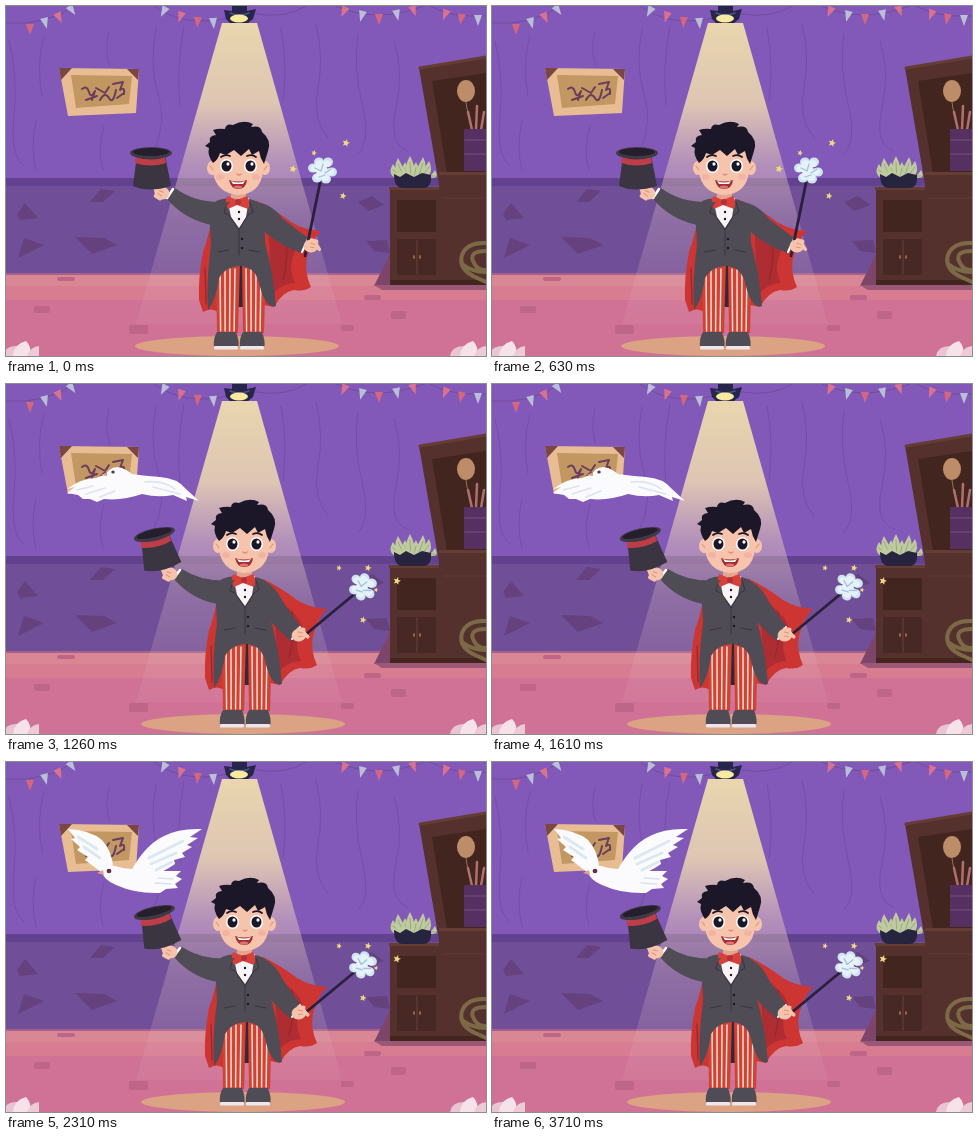
Animation, 480 px wide and 350 px high, one loop 3780 ms. Source, as an HTML page:

```html
<!DOCTYPE html>
<html lang="en">
<head>
<meta charset="utf-8">
<title>Magician</title>
<style>
html, body { margin: 0; width: 100%; height: 100%; overflow: hidden; background: #8259b8; }
svg { display: block; width: 480px; height: 350px; }
</style>
</head>
<body>
<svg id="stage" viewBox="0 0 480 350"></svg>
<script>
const LOOP = 3780, REVEAL = 1260, FLAP = 2170;

const shape = (d, fill, extra = '') => `<path d="${d}" fill="${fill}" ${extra}/>`;
const line = (d, color, w = 1, extra = '') =>
  `<path d="${d}" fill="none" stroke="${color}" stroke-width="${w}" stroke-linecap="round" stroke-linejoin="round" ${extra}/>`;
const oval = (x, y, rx, ry, fill, extra = '') =>
  `<ellipse cx="${x}" cy="${y}" rx="${rx}" ry="${ry}" fill="${fill}" ${extra}/>`;
const box = (x, y, w, h, fill, r = 0) =>
  `<rect x="${x}" y="${y}" width="${w}" height="${h}" rx="${r}" fill="${fill}"/>`;
const group = (inner, transform = '') => `<g transform="${transform}">${inner}</g>`;

const GREY = '#4f4c56', INK = '#1b1628', SKIN = '#f6c4ac', RED = '#d8403a', WHITE = '#fbfbfd';

function star(x, y, r = 4) {
  let d = '';
  for (let i = 0; i < 10; i++) {
    const a = i * Math.PI / 5 - 1.3, q = i % 2 ? r * .45 : r;
    d += (i ? 'L' : 'M') + (x + q * Math.cos(a)).toFixed(1) + ' ' + (y + q * Math.sin(a)).toFixed(1);
  }
  return shape(d + 'Z', '#f3d884');
}

const flag = (x, y, color, tilt) => group(shape('M-4 0H4L0 11Z', color), `translate(${x} ${y}) rotate(${tilt})`);

function bunting() {
  const pink = '#d9718f', pale = '#b9bfd6', red = '#d5667d';
  return line('M0 17Q40 20 68 0M148 0Q178 22 222 12M250 8Q280 13 300 0M330 0Q370 18 418 0M424 0Q446 12 480 10', '#6d4a98', .8) +
    [[24, 18, red, 0], [38, 12, pale, -15], [51, 7, pink, -25], [63, 0, pale, -35],
     [160, 1, pale, 28], [176, 6, pink, 18], [192, 11, red, 5], [207, 12, pale, -5],
     [340, 1, pink, 25], [357, 5, pale, 15], [373, 8, red, 0], [390, 4, pale, -12], [406, 0, pink, -20],
     [441, 4, pink, 22], [456, 8, red, 10], [472, 9, pale, 0]].map(f => flag(...f)).join('');
}

function room() {
  const cracks = 'M3 35Q12 70 8 110T18 160M38 30Q30 58 36 90M103 25Q98 45 104 60M150 22Q143 60 152 88' +
    'T148 145M178 20Q170 62 174 100M275 22Q282 60 277 96M310 18Q318 50 312 82T322 132' +
    'M352 28Q347 60 356 98T352 148M388 35Q398 65 390 102T402 145M30 115Q24 140 30 165M98 120Q91 145 97 164';
  const chips = 'M11 208L19 197L32 212L14 214ZM12 252L18 232L38 239ZM69 231L98 232L111 239L86 248Z' +
    'M84 196L95 183L109 185L97 196ZM352 196L366 190L378 199L362 205ZM360 235L381 234L384 247L368 245Z';
  const tiles = [[28, 300, 16, 7], [123, 319, 19, 9], [51, 271, 18, 4], [385, 305, 15, 8], [358, 289, 17, 5], [335, 319, 13, 6]];
  return box(0, 0, 480, 172, '#8259b8') + box(0, 172, 480, 96, '#704f98') +
    line(cracks, '#7047a5', 1, 'opacity=".65"') + box(0, 172, 480, 8, '#62428e') +
    shape(chips, '#65417d') + box(0, 268, 480, 82, '#d07296') +
    box(0, 268, 480, 12, '#d98795') + box(0, 280, 480, 14, '#d87c92') + box(0, 267, 480, 2, '#a5608b') +
    tiles.map(t => box(...t, '#bf6688', 2)).join('') + bunting();
}

function painting() {
  return shape('M53 62L133 63L130 107L62 110Z', '#e9bd93') +
    shape('M65 69L126 70L123 98L70 102Z', '#c39762') +
    line('M76 83Q81 79 83 86T89 85L86 94M90 82L99 87L103 81M94 94Q99 85 103 92T110 84M107 78L117 76L114 84Q119 80 118 88M80 94L91 90M111 92L118 87', '#6b3d5c', 2) +
    shape('M53 62L66 62L55 74ZM121 63L133 63L132 74Z', '#7a4644');
}

function leaf(x, y) {
  const root = 406 + (x - 406) * .6;
  return shape(`M${root - 5} 172Q${x - 6} ${y + 10} ${x} ${y}Q${x + 5} ${y + 9} ${root + 5} 172Z`, '#bfcb9e') +
    line(`M${x} ${y + 6}L${root} 170`, '#8f9f80', .8);
}

function cabinet() {
  const dark = '#42251f', mid = '#55312e', edge = '#653d35';
  const leaves = [[387, 158], [392, 152], [399, 156], [404, 150], [410, 156], [417, 151], [423, 155], [429, 164]];
  return shape('M384 248V280H368Z', '#7c4569') + shape('M368 279H480V284H376Z', '#9a5876') +
    shape('M413 62L480 51V184H434Z', mid) + shape('M426 75L480 67V167H441Z', dark) +
    line('M414 62L480 51', edge, 3) +
    line('M460 96Q461 105 466 124', '#967155', 1) + oval(460, 85, 9, 11, '#bd8c68') +
    line('M462 106L466 124M471 100L470 124M478 106L475 124', '#b0706f', 2.5) +
    box(458, 123, 22, 42, '#553061') + line('M459 134H480M459 148H480', '#6f4575', 1.5) +
    box(384, 181, 96, 98, mid) + box(433, 166, 47, 113, mid) + box(433, 166, 47, 3, edge) +
    box(383, 181, 50, 3, edge) + box(391, 194, 39, 32, dark) +
    box(391, 233, 39, 36, '#482824') + line('M411 234V268M437 192H480', edge, 1.2) +
    oval(408, 251, 1, 2, '#9a6e50') + oval(414, 251, 1, 2, '#9a6e50') + box(384, 274, 96, 5, dark) +
    leaves.map(l => leaf(...l)).join('') +
    shape('M388 168L394 171L400 167L408 171L416 167L425 169Q426 182 417 182H397Q388 182 388 168Z', '#26243f') +
    line('M480 237Q461 236 456 249Q452 263 469 271L480 276M480 245Q463 245 467 255T480 264M456 258Q466 266 480 266', '#7c6a46', 4);
}

function lamp() {
  return shape('M216 17H251L336 318H130Z', 'url(#beam)') +
    shape('M218 4L226 5V0H241V5L250 3L247 13L242 17H224L220 13Z', '#25264a') +
    line('M224 7Q233 11 243 7', '#51548a', 1.5) + oval(233, 12.5, 9, 4, '#f8ea9f');
}

function hat() {
  return shape('M-14 -14L-18 17Q-2 24 20 17L14 -14Z', '#3b3441') +
    shape('M-15 -12Q0 -7 14 -12L15 -6Q0 -1 -16 -6Z', '#bd3d48') +
    oval(0, -16, 21, 6, '#403946') + oval(0, -17, 18, 4, '#241e2d');
}

function bloom() {
  const petals = [[-9, -3], [-3, -9], [6, -9], [10, 1], [4, 8], [-5, 7]];
  return petals.map(([x, y]) => oval(x, y, 5, 4.5, '#cfe3f0')).join('') +
    petals.map(([x, y]) => oval(x * .8, y * .8, 4, 3.5, '#e6f2f8')).join('') + oval(0, 0, 6, 6, '#e6f2f8') +
    line('M-7 -3L-1 0L1 -7M3 2L9 -2M-3 6L3 4', '#9fc2de', 1.3);
}

function head() {
  const eye = x => oval(x, 160, 6.5, 7, '#fff') + oval(x, 160, 5, 5.5, INK) + oval(x + 1.5, 158, 1.6, 1.8, '#fff');
  return oval(206, 162, 5, 7, SKIN) + oval(259, 162, 5, 7, SKIN) +
    line('M204 160L207 164M261 160L258 164', '#e39680', 1.2) + box(225, 178, 15, 19, '#e5a48f') +
    shape('M208 143Q231 126 257 143V166Q254 188 232 189Q210 187 207 166Z', SKIN) +
    oval(214, 171, 4, 3, '#f2a99c', 'opacity=".6"') + oval(250, 171, 4, 3, '#f2a99c', 'opacity=".6"') +
    eye(220.5) + eye(244.5) + line('M215 151Q219 148 224 150M241 150Q246 148 250 151', INK, 1.8) +
    line('M231 168Q233 170 235 168', '#dc927e', 1.3) +
    shape('M223 174Q232 177 241 174Q240 183 232 183Q225 183 223 174Z', '#a32d35') +
    shape('M225 175Q232 178 239 175L237 178H227Z', '#fff') + oval(232, 181, 4, 1.5, '#e57372') +
    shape('M207 157Q201 149 203 142L199 140L204 136Q202 130 210 129L207 124Q213 122 219 123Q220 117 227 119Q238 113 247 118L245 121Q255 119 256 126Q266 134 262 145L258 158Q254 152 253 145L246 149L243 143L235 150L228 144L220 149L214 147Q212 154 207 157Z', INK);
}

function leg(x) {
  const stripes = [4, 9, 14, 19].map(s => `M${x + s} 263L${x + 1 + s * .9} 325`).join('');
  return shape(`M${x} 256H${x + 24}L${x + 22} 327H${x + 1}Z`, '#cf4238') + line(stripes, '#f7dcc8', 1.5) +
    shape(`M${x + 1} 326H${x + 20}Q${x + 24} 337 ${x + 22} 341H${x - 2}Q${x - 3} 332 ${x + 1} 326Z`, GREY) +
    box(x - 2, 340, 24, 3.5, '#eee6ea', 1);
}

function body() {
  return oval(231, 340, 102, 10, '#dba283') +
    shape('M208 198Q204 228 197 246Q192 272 193 294L197 306Q205 301 212 306L221 298H253L268 301Q276 286 288 284Q298 286 305 281Q298 266 301 252Q306 233 315 225Q298 224 285 216Q268 203 251 195Z', '#cd3533') +
    shape('M262 214Q288 230 290 243Q281 262 289 277Q276 277 266 289Z', '#ae2d32') +
    line('M199 262L200 298M280 228Q283 252 277 274', '#97282f', 1.3) +
    box(222, 260, 18, 41, '#352832') + leg(210) + leg(236) +
    shape('M210 195Q221 190 233 194Q249 190 258 202L259 237Q267 265 270 300Q259 304 252 273Q247 261 235 260Q220 260 213 272Q210 294 202 304Q200 275 205 239L203 202Z', GREY) +
    shape('M221 192L243 192L240 211L233 222L225 211Z', '#fbf4f7') +
    oval(233, 206, 1.2, 1.2, INK) + oval(233, 213, 1.2, 1.2, INK) +
    line('M221 196L218 207L223 209L233 224L242 209L247 206L244 196M233 224V249M212 246L223 244M243 244L254 246', '#38343f', 1) +
    oval(236, 233, 1.2, 1.2, INK) + oval(236, 242, 1.2, 1.2, INK) + head() +
    shape('M231 194L221 190Q218 198 222 203L231 199L242 203Q245 196 241 190Z', RED) + oval(232, 196, 3, 3, '#b5303a');
}

function fist(x, y, turn) {
  return group(oval(0, 0, 7.5, 6.5, SKIN) + line('M-8 -4L-5 1M-6 4L-1 6', SKIN, 3.5) +
    line('M-4 1L0 3M-3 -2L1 -1', '#dc947f', 1), `translate(${x} ${y}) rotate(${turn})`);
}

const wand = d => line(d, '#29213c', 2.8);

function openingPose() {
  return body() + shape('M224 196Q190 198 169 182L161 193Q178 213 205 219Z', GREY) +
    line('M167 183L161 192', '#fff', 2.5) + fist(156, 187, 10) + group(hat(), 'translate(145 163)') +
    shape('M249 196Q265 197 277 213L302 232L295 247Q270 238 251 219Z', GREY) +
    line('M302 233L296 246', '#fff', 2) + wand('M299 250L314 177') +
    fist(305, 240, 175) + group(bloom(), 'translate(316 165)') +
    star(340, 137) + star(308, 147, 3) + star(287, 163) + star(337, 190, 3.5);
}

function revealPose() {
  return group(body(), 'translate(6 0)') +
    shape('M229 196Q197 199 176 185L168 195Q185 215 211 220Z', GREY) +
    line('M174 186L168 194', '#fff', 2.5) + fist(164, 190, 5) + group(hat(), 'translate(152 166) rotate(-13)') +
    shape('M254 196Q268 199 277 218L294 242L285 257Q264 240 253 221Z', GREY) +
    line('M294 243L286 255', '#fff', 2) + wand('M293 256L351 208') + fist(293, 251, 165) +
    group(bloom(), 'translate(356 203) rotate(35)') +
    star(362, 184, 3.5) + star(333, 184, 3) + star(391, 197) + star(357, 236, 3.5) + star(370, 206, 2.5);
}

function birdDown() {
  return shape('M100 90Q103 84 111 83Q119 84 126 90Q139 92 154 93Q171 94 180 105L193 117L180 113L181 117L167 111Q152 114 136 110Q116 117 98 115L91 118L84 115L77 115L72 111L61 109L69 103L61 105Q76 94 90 94Z', WHITE) +
    line('M71 106L87 102M80 110L99 104M94 113L109 107M139 98Q157 96 169 105M147 103L174 110', '#dbe4ef', 1.6) +
    shape('M101 88L95 91L101 92Z', '#dc9a84') + oval(107, 88, 1.7, 1.5, '#543447');
}

function birdUp() {
  return shape('M107 107Q107 90 96 78Q84 68 62 67L69 76L65 77L74 85L71 88L82 95L79 98L95 110Z', WHITE) +
    shape('M125 109Q139 83 158 74Q173 66 196 67L184 75L192 76L181 83L186 85L176 91L179 95L168 98L169 102Q156 111 146 113Z', WHITE) +
    shape('M96 110Q99 102 109 104Q126 110 143 105L159 109L175 109L170 114L176 117L169 122L172 126L160 127L154 131Q130 132 110 123Q98 118 96 110Z', WHITE) +
    line('M72 75L91 87M78 85L94 96M143 96L177 79M145 102L170 91M150 108L166 100', '#dce8f1', 3) +
    line('M152 116L167 117M149 121L165 122', '#d9e2f0', 1.4) +
    shape('M97 108L91 111L98 113Z', '#dfa48c') + oval(103, 109, 2.4, 2.2, '#5b3544');
}

function corners() {
  const petals = shape('M-16 350Q-14 339 0 340L4 350Z', '#e9c5d3') + shape('M-6 350Q-5 338 7 335Q13 341 11 350Z', '#f6e3e9') +
    shape('M8 350Q11 341 20 340V350Z', '#eccbd7');
  return group(petals, 'translate(13 0)') + group(petals, 'translate(460 0)');
}

const layer = (id, inner) => `<g id="${id}">${inner}</g>`;
const beam = `<defs><linearGradient id="beam" x1="0" y1="0" x2="0" y2="1">
<stop offset="0" stop-color="#eedbae" stop-opacity=".96"/><stop offset=".27" stop-color="#ead4b2" stop-opacity=".88"/>
<stop offset=".47" stop-color="#e2c6bb" stop-opacity=".5"/><stop offset=".65" stop-color="#dfbfc5" stop-opacity=".28"/>
<stop offset="1" stop-color="#e6b2bd" stop-opacity=".1"/>
</linearGradient></defs>`;

document.getElementById('stage').innerHTML = beam + room() + painting() + cabinet() + lamp() +
  layer('opening', openingPose()) + layer('reveal', revealPose()) +
  layer('down', birdDown()) + layer('up', birdUp()) + corners();

const show = (id, on) => { document.getElementById(id).style.display = on ? '' : 'none'; };

const start = performance.now();
function draw() {
  const t = (performance.now() - start) % LOOP;
  show('opening', t < REVEAL);
  show('reveal', t >= REVEAL);
  show('down', t >= REVEAL && t < FLAP);
  show('up', t >= FLAP);
  requestAnimationFrame(draw);
}
draw();
</script>
</body>
</html>
```
